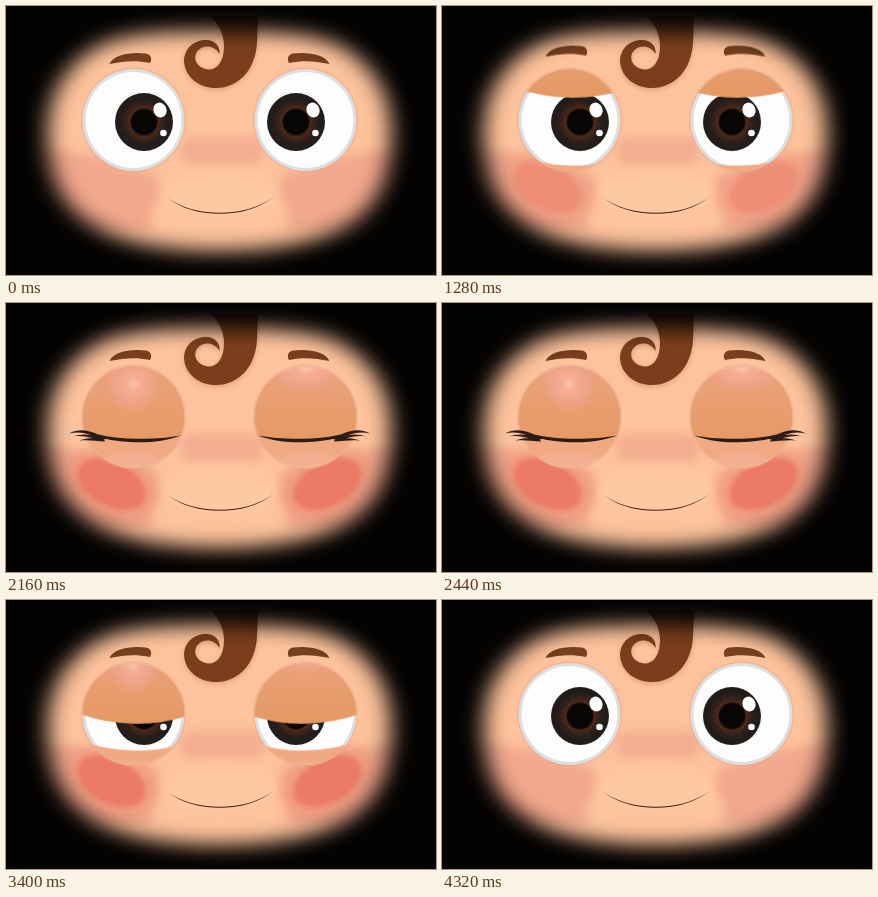
An HTML page for the animation above (4360 ms loop, 430 by 269 pixels).

```html
<!DOCTYPE html>
<html lang="en">
<head>
<meta charset="utf-8">
<title>Sleepy face</title>
<style>
  html, body { margin: 0; width: 100%; height: 100%; overflow: hidden; background: #040302; }
  svg { display: block; width: 100vw; height: 100vh; }
  .brows, .upper, .lower, .blush, .lashes { animation: 4360ms linear infinite; }
  .brows { animation-name: brows; }
  .upper { animation-name: upper; }
  .lower { animation-name: lower; }
  .blush { animation-name: blush; }
  .lashes { animation-name: lashes; }

  @keyframes brows {
    0% { transform: translateY(0); animation-timing-function: ease-in-out; }
    25% { transform: translateY(-9px); animation-timing-function: ease-in-out; }
    40% { transform: translateY(0); }
    78% { transform: translateY(0); animation-timing-function: ease-in-out; }
    89% { transform: translateY(-4px); animation-timing-function: ease-in-out; }
    98.5%, 100% { transform: translateY(0); }
  }
  @keyframes upper {
    0%, 17.4% { transform: translateY(-80px); animation-timing-function: cubic-bezier(.5, 0, .6, 1); }
    42% { transform: translateY(0); }
    69.7% { transform: translateY(0); animation-timing-function: ease-in-out; }
    97.2%, 100% { transform: translateY(-80px); }
  }
  @keyframes lower {
    0%, 17.4% { transform: translateY(35px); animation-timing-function: cubic-bezier(.5, 0, .6, 1); }
    42% { transform: translateY(0); }
    69.7% { transform: translateY(0); animation-timing-function: ease-in-out; }
    90.5%, 100% { transform: translateY(35px); }
  }
  @keyframes blush {
    0%, 15% { opacity: 0; animation-timing-function: ease-in-out; }
    42% { opacity: 1; }
    75% { opacity: 1; animation-timing-function: ease-in-out; }
    98%, 100% { opacity: 0; }
  }
  @keyframes lashes {
    0%, 39% { opacity: 0; }
    41%, 71% { opacity: 1; }
    73%, 100% { opacity: 0; }
  }
</style>
</head>
<body>
<svg viewBox="0 0 430 269" preserveAspectRatio="none">
  <defs>
    <filter id="edge" filterUnits="userSpaceOnUse" x="0" y="0" width="430" height="269">
      <feGaussianBlur stdDeviation="11 10"/>
    </filter>
    <filter id="soft" filterUnits="userSpaceOnUse" x="0" y="0" width="430" height="269" color-interpolation-filters="sRGB">
      <feGaussianBlur stdDeviation="5"/>
    </filter>
    <filter id="haze" filterUnits="userSpaceOnUse" x="0" y="0" width="430" height="269" color-interpolation-filters="sRGB">
      <feGaussianBlur stdDeviation="2.5"/>
    </filter>
    <mask id="face" maskUnits="userSpaceOnUse" x="0" y="0" width="430" height="269">
      <path fill="#fff" filter="url(#edge)" d="M42 122C43 92 57 62 88 43C112 28 150 25 213 25C276 25 315 28 339 43C370 62 384 92 385 122C386 165 374 198 345 217C310 239 260 245 213 245C165 245 115 238 84 217C53 197 41 165 42 122Z"/>
    </mask>
    <clipPath id="sockets">
      <circle cx="127.500" cy="114" r="51"/>
      <circle cx="299.500" cy="114" r="51"/>
    </clipPath>
    <radialGradient id="iris">
      <stop offset=".42" stop-color="#080605"/>
      <stop offset=".5" stop-color="#4d2a18"/>
      <stop offset=".62" stop-color="#38231a"/>
      <stop offset=".78" stop-color="#241d1a"/>
      <stop offset="1" stop-color="#211d1c"/>
    </radialGradient>
    <radialGradient id="shine">
      <stop offset="0" stop-color="#fac4ab"/>
      <stop offset=".25" stop-color="#f4ad92"/>
      <stop offset=".6" stop-color="#f1a48a"/>
      <stop offset="1" stop-color="#eda184" stop-opacity="0"/>
    </radialGradient>
    <linearGradient id="lid" x1="0" y1="0" x2="0" y2="1">
      <stop offset=".5" stop-color="#eca37c"/>
      <stop offset="1" stop-color="#e59964"/>
    </linearGradient>

    <path id="brow" fill="#77401f" d="M103.500 58C107 49 124 45.500 140 47.500C145 48.500 146.500 53 144 57C130 54 118 55 103.500 58Z"/>
    <path id="curl" d="M204 10C212 17 218 27 218 40C218 56 211 64 202 63.500C190 62 186 51 192 44.500C198 38 209 39.500 213.500 48C215 39 207 33 198 34C186 35 178 44 178 55C179 72 194 82 210 82C233 82 250 63 251 36L252 10Z"/>
    <g id="white">
      <circle cx="127.500" cy="114" r="52.500" fill="#f0a585" opacity=".55"/>
      <circle cx="127.500" cy="114" r="51" fill="#dcdfe0"/>
      <circle cx="127.500" cy="114" r="48" fill="#fdfdfd"/>
    </g>
    <circle id="ball" cx="138" cy="116" r="29" fill="url(#iris)"/>
    <path id="top" fill="url(#lid)" d="M70 -10H185V130Q128 149 70 128Z"/>
    <path id="bottom" fill="#f0a981" d="M70 128Q128 149 185 130V220H70Z"/>
    <path id="lash" fill="#2b1c17" d="M175 132.500C150 137 112 138 80 128.500C95 139 145 144.500 175 132.500ZM100 136C88 128 75 124 63 130.500C75 127.500 84 131 94 137ZM98 137C88 131.500 77 129.500 67 133.500C78 132 86 134.500 94 138ZM98 136.500C90 135 82 134.500 73 137.500C82 136.500 90 138 99 138.500Z"/>
    <ellipse id="cheek" cx="105.500" cy="181" rx="37" ry="22.500" transform="rotate(28 105.500 181)"/>
  </defs>

  <g mask="url(#face)">
    <rect width="430" height="269" fill="#fdc39c"/>
    <g filter="url(#soft)">
      <path fill="#f2a88d" d="M20 147C70 135 125 165 150 168Q158 186 146 202Q142 216 149 224H75L20 205ZM410 147C357 135 302 165 277 168Q269 186 281 202Q285 216 278 224H352L410 205Z"/>
      <rect x="175" y="132" width="82" height="26" rx="8" fill="#f3ad90"/>
      <ellipse cx="214" cy="188" rx="58" ry="24" fill="#fec8a2"/>
    </g>

    <g class="blush">
      <g fill="#ef9579" opacity=".55" filter="url(#soft)">
        <ellipse cx="106" cy="182" rx="49" ry="33" transform="rotate(28 106 182)"/>
        <ellipse cx="321" cy="182" rx="49" ry="33" transform="rotate(-28 321 182)"/>
      </g>
      <g fill="#ec7a65" filter="url(#haze)">
        <use href="#cheek"/>
        <use href="#cheek" transform="matrix(-1 0 0 1 427 0)"/>
      </g>
    </g>

    <use href="#curl" y="1.500" fill="#9c5638" opacity=".35" filter="url(#haze)"/>
    <use href="#curl" fill="#7a3e1d"/>

    <g class="brows">
      <use href="#brow"/>
      <use href="#brow" transform="matrix(-1 0 0 1 427 0)"/>
    </g>

    <path fill="#3d1a12" d="M160.500 191C186 212 242 212 268 190.500C242 213.500 186 213.500 160.500 191Z"/>

    <use href="#white"/>
    <use href="#white" transform="matrix(-1 0 0 1 427 0)"/>
    <use href="#ball"/>
    <use href="#ball" x="152"/>
    <g fill="#fff">
      <ellipse cx="154" cy="104" rx="6.500" ry="7.500" transform="rotate(-20 154 104)"/>
      <circle cx="157.500" cy="127" r="3.300"/>
      <ellipse cx="307" cy="104" rx="6.500" ry="7.500" transform="rotate(-20 307 104)"/>
      <circle cx="309.500" cy="127" r="3.300"/>
    </g>

    <g clip-path="url(#sockets)">
      <g class="lower">
        <use href="#bottom"/>
        <use href="#bottom" transform="matrix(-1 0 0 1 427 0)"/>
        <g fill="#f4b396" opacity=".8" filter="url(#haze)">
          <ellipse cx="127" cy="162" rx="34" ry="12"/>
          <ellipse cx="300" cy="162" rx="34" ry="12"/>
        </g>
      </g>
      <g class="upper">
        <use href="#top"/>
        <use href="#top" transform="matrix(-1 0 0 1 427 0)"/>
        <circle cx="127" cy="81" r="29" fill="url(#shine)"/>
        <ellipse cx="300" cy="66" rx="40" ry="26" fill="url(#shine)"/>
      </g>
    </g>

    <g class="lashes">
      <use href="#lash"/>
      <use href="#lash" transform="matrix(-1 0 0 1 427 0)"/>
    </g>
  </g>
</svg>
</body>
</html>
```
